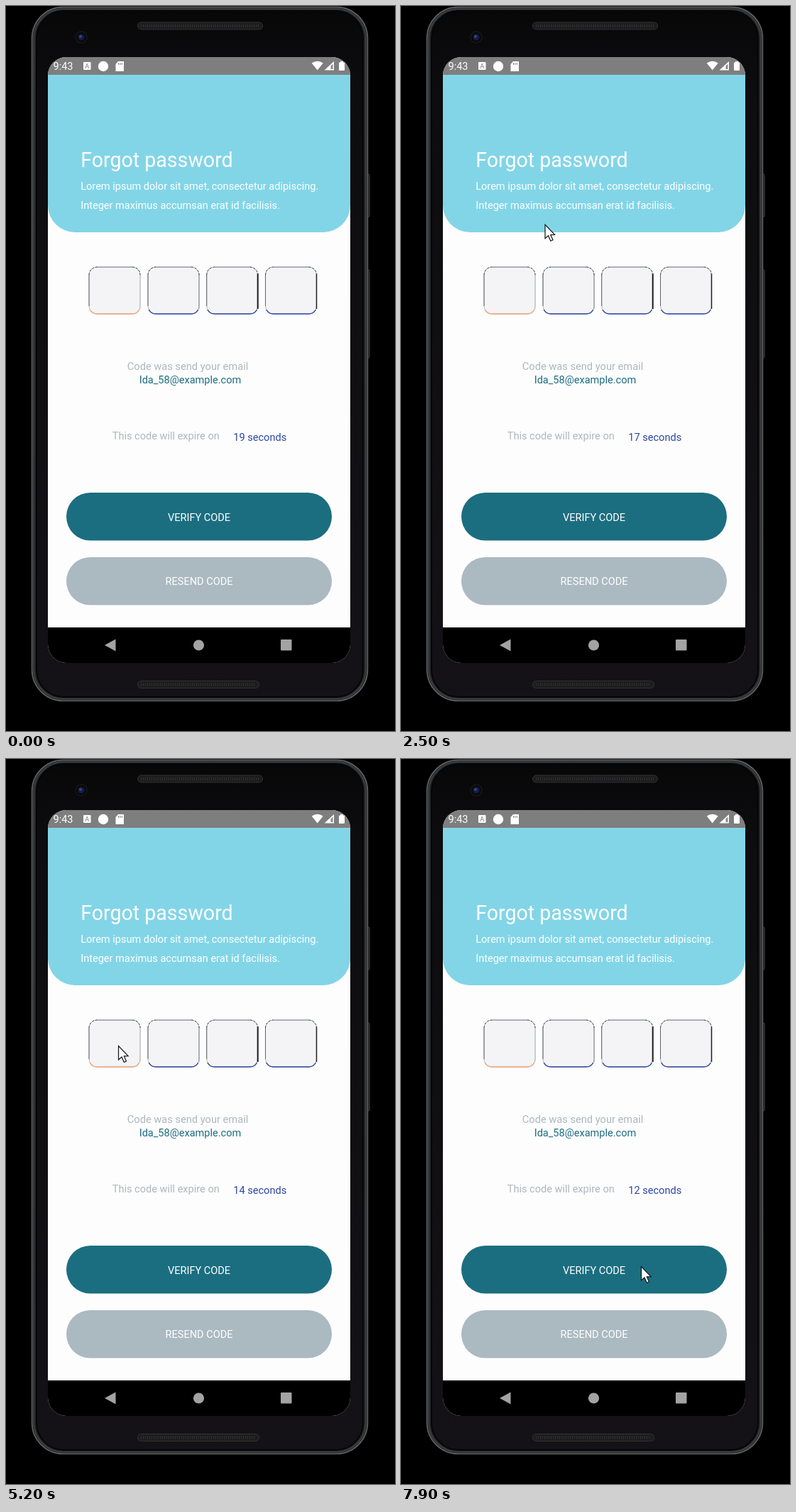
Write an HTML page with a canvas that moves like this. It is 548x1022 px and loops after 8 s.

```html
<!DOCTYPE html>
<html lang="en">
<head>
<meta charset="utf-8">
<title>Forgot password</title>
<style>
  html, body { margin: 0; width: 100%; height: 100%; overflow: hidden; background: #000; }
  canvas { display: block; width: 548px; height: 1022px; }
</style>
</head>
<body>
<canvas id="stage" width="548" height="1022"></canvas>
<script>
const LOOP = 8000, STEP = 100;
const ctx = document.getElementById('stage').getContext('2d');

// Pointer path: time, x, y of the tip
const PATH = [
  [1400, 34, 142], [1600, 118, 106], [1900, 132, 103], [2700, 226, 376],
  [3100, 242, 406], [3600, 242, 406], [4200, 170, 400], [4400, 170, 400],
  [4900, 158, 404], [6400, 158, 404], [6900, 230, 407], [7200, 230, 407],
  [7800, 338, 715], [8000, 338, 715]
];
const ARROW = [[0, 0], [0, 19.5], [4.5, 15.6], [7.8, 23], [11, 21.5], [7.8, 14.4], [13.6, 14.2]];

function box(x, y, w, h, r, fill, stroke, line = 1) {
  ctx.beginPath();
  ctx.roundRect(x, y, w, h, r);
  if (fill) { ctx.fillStyle = fill; ctx.fill(); }
  if (stroke) { ctx.strokeStyle = stroke; ctx.lineWidth = line; ctx.stroke(); }
}

function disc(x, y, r, fill) {
  ctx.beginPath();
  ctx.arc(x, y, r, 0, Math.PI * 2);
  ctx.fillStyle = fill;
  ctx.fill();
}

function poly(points, fill) {
  ctx.beginPath();
  points.forEach(([x, y]) => ctx.lineTo(x, y));
  ctx.closePath();
  ctx.fillStyle = fill;
  ctx.fill();
}

function line(x1, y1, x2, y2, color, width) {
  ctx.beginPath();
  ctx.moveTo(x1, y1);
  ctx.lineTo(x2, y2);
  ctx.strokeStyle = color;
  ctx.lineWidth = width;
  ctx.stroke();
}

function label(str, x, y, size, color, align = 'left') {
  ctx.font = `${size}px Roboto, sans-serif`;
  ctx.textAlign = align;
  ctx.fillStyle = color;
  ctx.fillText(str, x, y);
}

function speaker(x, y, w) {
  box(x, y, w, 10, 5, '#1c1c1d', '#333334');
  for (let i = x + 5; i < x + w - 4; i += 3) {
    line(i, y + 3, i, y + 7, '#343436', 1);
  }
}

function drawPhone() {
  box(508, 237, 4, 60, 1.5, '#111', '#4a4b4b');
  box(508, 372, 4, 124, 1.5, '#111', '#4a4b4b');
  const body = ctx.createLinearGradient(0, 0, 0, 980);
  body.addColorStop(0, '#070708');
  body.addColorStop(0.12, '#0d0c0e');
  body.addColorStop(1, '#141216');
  box(36.5, 1.5, 473, 978, 44, '#232425', '#606263', 1.5);
  box(39, 4, 468, 973, 42, null, '#3b3c3d', 2);
  box(43, 7, 460, 967, 38, body, '#050506', 2);
  speaker(185.5, 23, 176);
  speaker(185.5, 951.5, 171);
  disc(106, 44, 9, '#151518');
  disc(106, 44, 7, '#08080c');
  disc(106, 44, 4.5, '#151c42');
  disc(105, 43, 2, '#34477f');
}

function drawStatus() {
  ctx.fillStyle = '#7f7e7f';
  ctx.fillRect(59, 72, 426, 25);
  label('9:43', 66.5, 90, 14.5, '#fff');
  box(109, 79, 10.5, 11, 1, '#fff');
  label('A', 114.2, 88, 9, '#777', 'center');
  disc(137, 85, 7.2, '#fff');
  poly([[158, 78], [166, 78], [166, 92], [154.5, 92], [154.5, 82]], '#fff');
  for (let i = 0; i < 3; i++) line(158.5 + i * 2.4, 80, 158.5 + i * 2.4, 83, '#7f7e7f', 1);
  ctx.beginPath();
  ctx.moveTo(438.7, 90.5);
  ctx.lineTo(430.7, 80.5);
  ctx.quadraticCurveTo(438.7, 75, 446.7, 80.5);
  ctx.closePath();
  ctx.fillStyle = '#fff';
  ctx.fill();
  poly([[448.5, 90.5], [462, 78], [462, 90.5]], '#fff');
  poly([[457.5, 89], [457.5, 84.5], [460.5, 81.5], [460.5, 89]], '#8b8a8b');
  box(469, 79.5, 8, 11.5, 1, '#fff');
  box(471, 78, 4, 2, 0.5, '#fff');
}

function drawNav() {
  ctx.fillStyle = '#000';
  ctx.fillRect(59, 876, 426, 50);
  poly([[139, 901], [154.5, 892.5], [154.5, 909.5]], '#a3a3a3');
  disc(271.5, 901, 7.6, '#a3a3a3');
  box(387, 893, 15.5, 15.5, 1, '#a3a3a3');
}

function drawField(x, accent, rightColor, rightWidth) {
  const w = 72, y = 368, h = 66, r = 11;
  box(x, y, w, h, r, '#f4f3f5', '#a4a9a9', 0.8);
  line(x + r, y, x + w - r, y, '#7d8987', 1);
  line(x, y + r, x, y + h - r, '#555a5c', 0.9);
  line(x + w, y + r - 2, x + w, y + h - r + 4, rightColor, rightWidth);
  ctx.setLineDash([3, 2]);
  ctx.beginPath();
  ctx.arc(x + r, y + r, r, Math.PI, Math.PI * 1.5);
  ctx.moveTo(x + w - r, y);
  ctx.arc(x + w - r, y + r, r, -Math.PI / 2, 0);
  ctx.strokeStyle = '#39404a';
  ctx.lineWidth = 1;
  ctx.stroke();
  ctx.setLineDash([]);
  ctx.beginPath();
  ctx.arc(x + w - r, y + h - r, r, Math.PI * 0.15, Math.PI / 2);
  ctx.arc(x + r, y + h - r, r, Math.PI / 2, Math.PI * 0.85);
  ctx.strokeStyle = accent;
  ctx.lineWidth = 1.5;
  ctx.stroke();
}

function drawScreen(seconds) {
  ctx.save();
  ctx.beginPath();
  ctx.roundRect(59, 72, 426, 854, 26);
  ctx.clip();
  ctx.fillStyle = '#fefdfe';
  ctx.fillRect(59, 72, 426, 854);
  box(59, 96.5, 426, 222.5, [0, 0, 38, 38], '#82d5e7');
  drawStatus();
  drawNav();
  ctx.restore();

  label('Forgot password', 105.2, 227, 28.6, '#fff');
  label('Lorem ipsum dolor sit amet, consectetur adipiscing.', 105.2, 258.5, 14.55, '#fff');
  label('Integer maximus accumsan erat id facilisis.', 105.2, 286, 14.55, '#fff');

  drawField(117, '#f0a57c', '#b9bcbc', 0.8);
  drawField(200, '#3148a4', '#6d7478', 0.8);
  drawField(282.7, '#3148a4', '#1b1c20', 2);
  drawField(365.5, '#3148a4', '#1b1c20', 1.5);

  label('Code was send your email', 256, 512.5, 14.65, '#acb7bd', 'center');
  label('Ida_58@example.com', 259.5, 532, 14.55, '#1b6c7f', 'center');
  label('This code will expire on', 149.7, 610.5, 14.55, '#acb7bd');
  label(seconds + ' seconds', 320.3, 613, 14.55, '#2c46a2');

  box(85, 686, 374, 67.5, 33.7, '#1b6e80');
  label('VERIFY CODE', 272, 725.5, 14.55, '#fff', 'center');
  box(85, 777, 374, 67.5, 33.7, '#abb9c1');
  label('RESEND CODE', 272, 816, 14.55, '#fff', 'center');
}

function pointerAt(t) {
  const i = PATH.findIndex(p => p[0] > t);
  if (i < 1) return null;
  const [t0, x0, y0] = PATH[i - 1], [t1, x1, y1] = PATH[i];
  const k = (t - t0) / (t1 - t0);
  return [x0 + (x1 - x0) * k, y0 + (y1 - y0) * k];
}

function drawPointer([x, y]) {
  ctx.save();
  ctx.translate(x + 0.5, y + 0.5);
  poly(ARROW, '#fafafa');
  ctx.strokeStyle = '#111217';
  ctx.lineWidth = 1.2;
  ctx.stroke();
  ctx.restore();
}

function draw(time) {
  const t = Math.floor((time % LOOP) / STEP) * STEP;
  const seconds = 19 - Math.max(0, Math.floor((t - 150) / 1000));
  ctx.fillStyle = '#000';
  ctx.fillRect(0, 0, 548, 1022);
  drawPhone();
  drawScreen(seconds);
  const tip = pointerAt(t);
  if (tip) drawPointer(tip);
}

const start = performance.now();
function frame() {
  draw(performance.now() - start);
  requestAnimationFrame(frame);
}
frame();
</script>
</body>
</html>
```
